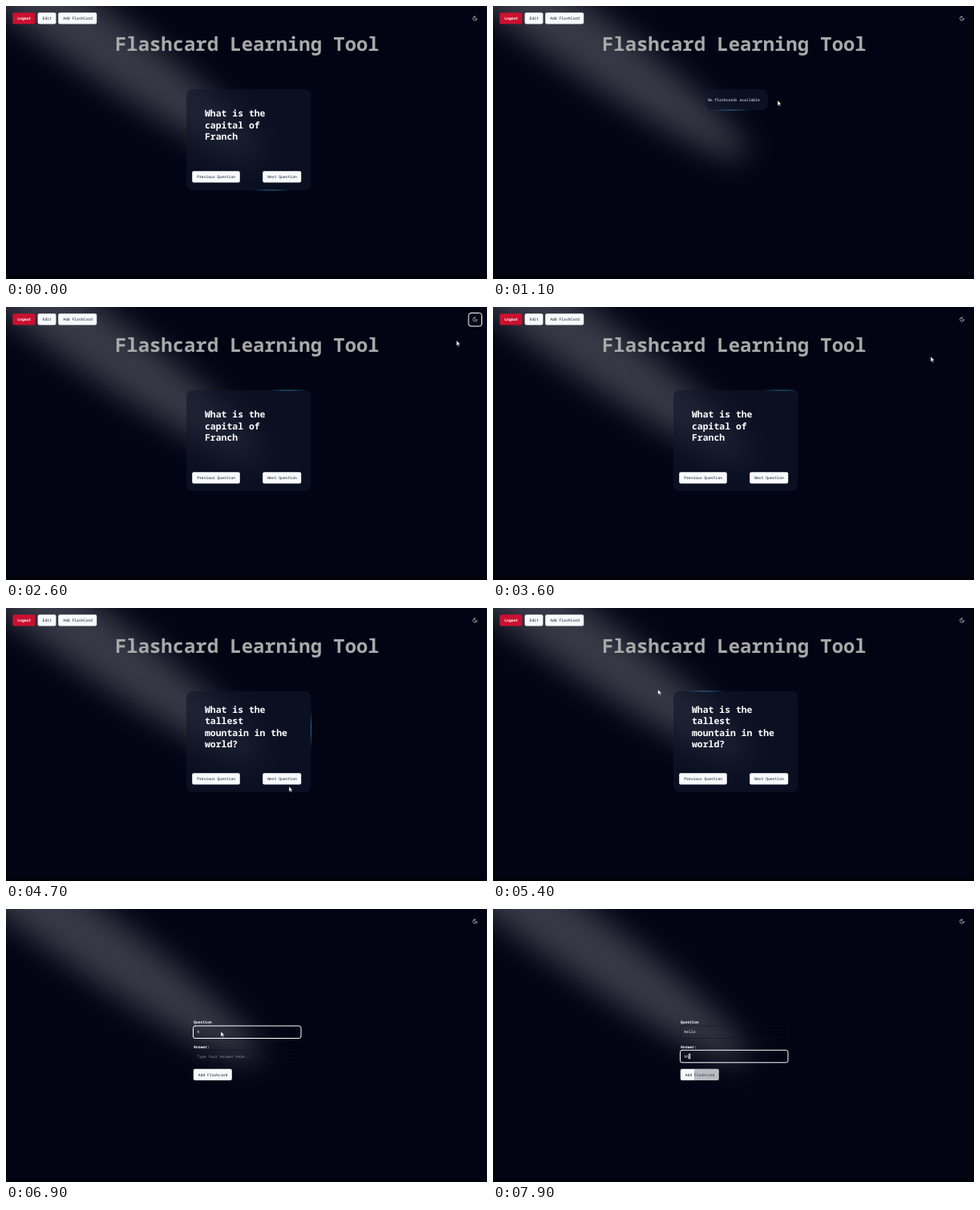
Recreate the animation shown at these times as an HTML page. Size 600 px wide and 341 px high, loop 8000 ms.

```html
<!DOCTYPE html>
<html lang="en">
<head>
<meta charset="utf-8">
<title>Flashcards</title>
<style>
  html, body { margin: 0; width: 100%; height: 100%; overflow: hidden; }
  svg {
    display: block; width: 600px; height: 341px; background: var(--bg);
    font: 4.7px "Noto Sans Mono", "DejaVu Sans Mono", monospace;
    text-rendering: geometricPrecision;
    --bg: #020414; --ink: #fff; --btn: #f8fafc; --btnInk: #0b1022; --title: #a9a9a9;
    --card: #10162b; --cardAlpha: .6; --beam: #fff; --foot: #01020a; --glow: #38a9dd;
  }
  svg.light {
    --bg: #fdfdfd; --ink: #0b1022; --btn: #0b1022; --btnInk: #f8fafc; --title: #8d8d8d;
    --card: #fff; --cardAlpha: .25; --beam: #000; --foot: #fdfdfd; --glow: #b0b4b8;
  }
  text { fill: var(--ink); white-space: pre; }
  .btn rect { fill: var(--btn); }
  .btn text { fill: var(--btnInk); }
  .btn.red rect { fill: #cb1030; }
  .btn.red text { fill: #fff; font-weight: 600; }
  .title { font-size: 23.9px; font-weight: 700; fill: var(--title); }
  .quiz { font-size: 11.45px; font-weight: 700; }
  .card { fill: var(--card); fill-opacity: var(--cardAlpha); }
  .line { fill: none; stroke: var(--ink); stroke-linecap: round; stroke-linejoin: round; }
  .hint { fill: #8a91a0; }
  .label { font-weight: 600; }
  .url { font: 4px Roboto, "Open Sans", sans-serif; fill: #d4d5d9; }
</style>
</head>
<body>
<svg id="stage" viewBox="0 0 600 341">
  <defs>
    <filter id="soft" x="-50%" y="-100%" width="200%" height="300%"><feGaussianBlur stdDeviation="18"/></filter>
    <radialGradient id="glow" gradientUnits="userSpaceOnUse" r="24">
      <stop offset=".2" stop-color="var(--glow)" stop-opacity=".6"/>
      <stop offset="1" stop-color="var(--glow)" stop-opacity="0"/>
    </radialGradient>
  </defs>
  <rect y="337" width="600" height="4" fill="var(--foot)"/>
  <g id="beam">
    <g transform="translate(72 14) rotate(35.5)">
      <ellipse rx="300" ry="40" fill="var(--beam)" fill-opacity=".21" filter="url(#soft)"/>
    </g>
  </g>

  <g id="home">
    <g id="nav"></g>
    <text class="title" x="136" y="56">Flashcard Learning Tool</text>
    <rect id="card" class="card" y="104" rx="8"/>
    <rect id="edge" y="104" rx="8" fill="none" stroke="url(#glow)"/>
    <text id="none" x="268" y="119">No flashcards available</text>
    <g id="deck">
      <g id="quiz" class="quiz"></g>
      <g id="steps"></g>
    </g>
  </g>

  <g id="form">
    <text class="label" x="234" y="143">Question</text>
    <rect id="box1" class="line" x="233.5" y="146" width="134.5" height="15.5" rx="2.5"/>
    <text id="in1" x="238.5" y="155"></text>
    <text class="label" x="234" y="173.5">Answer:</text>
    <rect id="box2" class="line" x="233.5" y="176.3" width="134.5" height="15.5" rx="2.5"/>
    <text id="in2" x="238.5" y="185.6"></text>
    <g id="send"></g>
    <rect id="dim" x="251" y="200" width="31" height="14" rx="1.5" fill="#5a5e6a" fill-opacity=".4"/>
  </g>

  <rect id="ring" class="line" x="577" y="7.5" width="16.5" height="16.5" rx="3"/>
  <g class="line" transform="translate(581.6 12.1) scale(.285)" stroke-width="2">
    <path id="moon" d="M12 3a6 6 0 0 0 9 9 9 9 0 1 1-9-9Z"/>
    <path id="sun" d="M8 12a4 4 0 1 0 8 0a4 4 0 1 0-8 0M12 2v2M12 20v2M2 12h2M20 12h2M5 5l1.4 1.4M17.6 17.6L19 19M5 19l1.4-1.4M17.6 6.4L19 5"/>
  </g>

  <g id="status">
    <rect y="334" width="96" height="7" fill="#26282f"/>
    <text class="url" x="1.5" y="339.2">https://flash-card-blond.vercel.app/addflashcard</text>
  </g>
  <path id="arrow" d="M0 0V6.4L1.5 5 2.6 7.3 3.6 6.8 2.5 4.6H4.6Z" fill="#fff" stroke="#222" stroke-width=".4"/>
  <g id="beamCursor">
    <rect x="-1.4" y="-3.2" width="3" height="6.4" fill="#a4a7b0" fill-opacity=".7"/>
    <path d="M-1-2.8H1M0-2.8V2.8M-1 2.8H1" stroke="#fff" stroke-width=".6"/>
  </g>
</svg>
<script>
const LOOP = 8000;
const $ = id => document.getElementById(id);
const show = (id, on) => $(id).style.display = on ? '' : 'none';
const within = (t, a, b) => t >= a && t < b;
const ease = p => p * p * (3 - 2 * p);
const clamp = p => Math.max(0, Math.min(1, p));

function button(parent, x, y, width, label, extra = '') {
  $(parent).innerHTML += `<g class="btn ${extra}"><rect x="${x}" y="${y}" width="${width}" height="14.3" rx="2"/>
    <text x="${x + 6}" y="${y + 8.9}">${label}</text></g>`;
}
button('nav', 8.3, 8.3, 28, 'Logout', 'red');
button('nav', 39.6, 8.3, 22.8, 'Edit');
button('nav', 65.2, 8.3, 48, 'Add FlashCard');
button('steps', 232.2, 206.2, 59.6, 'Previous Question');
button('steps', 320.2, 206.2, 48, 'Next Question');
button('send', 233.8, 199.8, 48, 'Add Flashcard');

const questions = [
  ['What is the', 'capital of', 'Franch'],
  ['What is the', 'tallest', 'mountain in the', 'world?']
].map(lines => lines.map((line, i) =>
  `<text x="248" y="${138 + 14.5 * i - (lines.length - 3) * 7.2}">${line}</text>`).join(''));

// time, x, y of the pointer
const path = [
  [0, 60, -15], [550, 60, -15], [1100, 355, 118], [1500, 585, 16], [1700, 585, 16],
  [1900, 567, 31], [2150, 584, 16], [2350, 584, 16], [2600, 562, 42], [3600, 546, 62],
  [4200, 350, 213], [4450, 350, 214], [4700, 353, 223], [5100, 353, 216], [5650, 95, 16],
  [6050, 95, 16], [6700, 268, 153], [7250, 268, 153], [7500, 245, 184], [8000, 245, 184]
];
function pointer(t) {
  const i = path.findIndex(k => k[0] > t);
  const [t0, x0, y0] = path[i - 1], [t1, x1, y1] = path[i];
  const p = ease((t - t0) / (t1 - t0));
  return [x0 + (x1 - x0) * p, y0 + (y1 - y0) * p];
}

function setCard(t, empty) {
  const [x, w, h] = empty ? [265, 78, 26] : [225, 155.5, 126];
  for (const id of ['card', 'edge']) {
    $(id).setAttribute('x', x);
    $(id).setAttribute('width', w);
    $(id).setAttribute('height', h);
  }
  const turn = (.215 + (t - 2600) / 985 + 9) % 1;
  const spot = $('edge').getPointAtLength(turn * $('edge').getTotalLength());
  $('glow').setAttribute('cx', spot.x);
  $('glow').setAttribute('cy', spot.y);
}

function setInput(n, value, hint, focused) {
  const text = $('in' + n), box = $('box' + n);
  text.textContent = value || hint;
  text.setAttribute('class', value ? '' : 'hint');
  box.style.stroke = focused ? '#fff' : '#0c1020';
  box.style.strokeWidth = focused ? 1 : .5;
}

let asked = -1;
function draw(t) {
  const light = within(t, 1600, 2300), form = t >= 5800, empty = within(t, 200, 1300);
  $('stage').setAttribute('class', light ? 'light' : '');

  const grow = t < 200 ? 1 : ease(clamp((t - 300) / 600));
  $('beam').setAttribute('transform', `translate(${-90 * (1 - grow)} ${-60 * (1 - grow)}) scale(${.5 + grow / 2})`);
  $('beam').style.opacity = grow;

  show('home', !form);
  show('form', form);
  show('none', empty);
  show('deck', !empty);
  show('sun', light);
  show('moon', !light);
  show('ring', within(t, 1550, 3100));
  show('status', within(t, 5600, 6250));

  if (!form) {
    setCard(t, empty);
    const q = t < 4450 ? 0 : 1;
    if (q !== asked) $('quiz').innerHTML = questions[asked = q];
  } else {
    const typed = (word, start, step) => word.slice(0, Math.max(0, Math.floor((t - start) / step)));
    setInput(1, typed('hello', 6800, 75), 'Type Your Question here...', within(t, 6700, 7400));
    setInput(2, typed('hh', 7500, 120), 'Type Your Answer here...', t >= 7400);
    show('dim', t >= 7700);
  }

  const [x, y] = pointer(t), typing = t >= 7400;
  show('arrow', !typing);
  show('beamCursor', typing);
  $(typing ? 'beamCursor' : 'arrow').setAttribute('transform', `translate(${x} ${y})`);
}

const start = performance.now();
function tick() {
  draw((performance.now() - start) % LOOP);
  requestAnimationFrame(tick);
}
tick();
</script>
</body>
</html>
```
